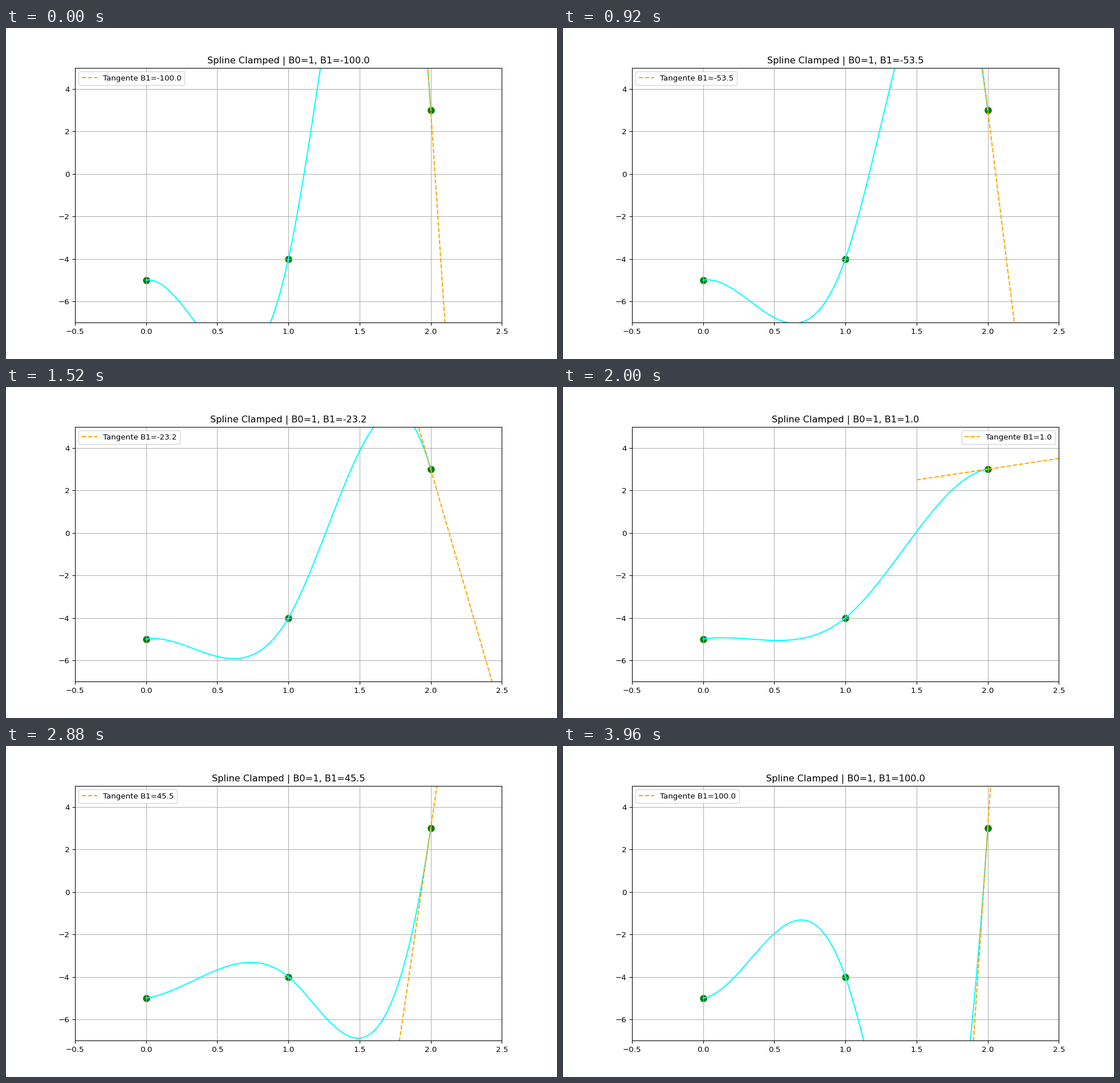
A matplotlib script that plays this animation: 966x580 px, repeating every 4 s.

```python
import numpy as np
import matplotlib.pyplot as plt
from matplotlib.animation import FuncAnimation

FRAMES = 100
X = np.array([0.0, 1.0, 2.0])
Y = np.array([-5.0, -4.0, 3.0])
B0 = 1
slopes = np.linspace(-100, 100, FRAMES)

t = np.linspace(0, 1, 101)
curve_x = np.concatenate([t, 1 + t[1:]])
tan_x = np.array([X[2] - 0.5, X[2] + 0.5])


def hermite(ya, yb, da, db):
    """Cubic on the unit interval with given end values and slopes."""
    return (ya * (2*t**3 - 3*t**2 + 1) + yb * (3*t**2 - 2*t**3)
            + da * (t**3 - 2*t**2 + t) + db * (t**3 - t**2))


def clamped_spline(b1):
    # Continuity of the second derivative fixes the middle slope.
    mid = (3 * (Y[2] - Y[0]) - B0 - b1) / 4
    left = hermite(Y[0], Y[1], B0, mid)
    right = hermite(Y[1], Y[2], mid, b1)
    return np.concatenate([left, right[1:]])


plt.rcParams["font.family"] = "DejaVu Sans"
# 966 x 580 pixels
fig, ax = plt.subplots(figsize=(10, 6.00415), dpi=96.6)
ax.scatter(X, Y, s=70, color="green")
curve, = ax.plot(curve_x, clamped_spline(slopes[0]), color="cyan")
tangent, = ax.plot(tan_x, tan_x, "--", color="orange", label="Tangente")
ax.set_xlim(-0.5, 2.5)
ax.set_ylim(-7, 5)
ax.grid(True)
title = ax.set_title("")
legend = ax.legend(loc="best")
label = legend.get_texts()[0]


def update(i):
    b1 = slopes[i]
    curve.set_ydata(clamped_spline(b1))
    tangent.set_ydata(Y[2] + b1 * (tan_x - X[2]))
    title.set_text(f"Spline Clamped | B0={B0}, B1={b1:.1f}")
    label.set_text(f"Tangente B1={b1:.1f}")
    return curve, tangent, title, label


anim = FuncAnimation(fig, update, frames=FRAMES, interval=40,
                     init_func=lambda: update(0), repeat=True, blit=False)
plt.show()
```
